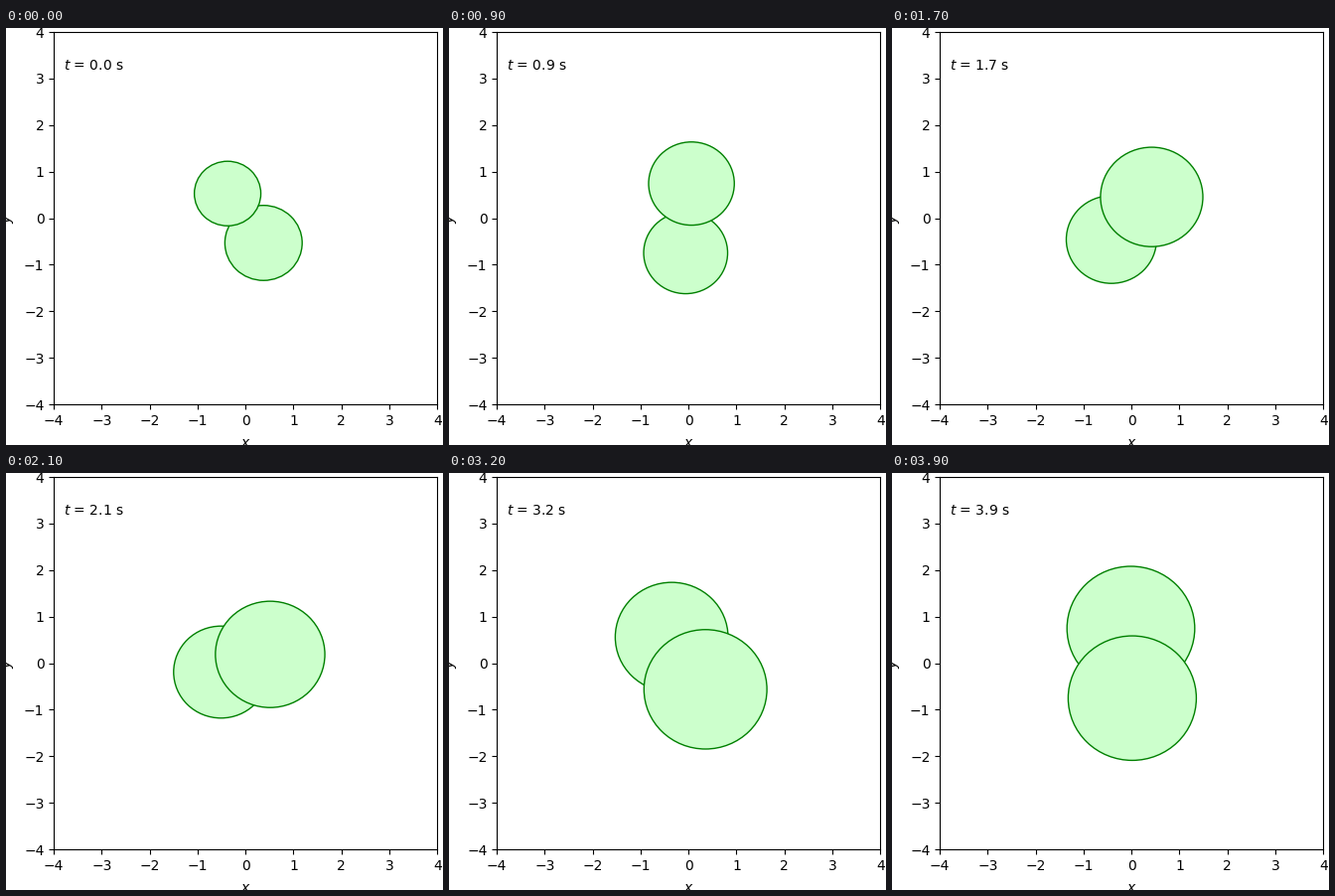
Animation of 440x420 px, one loop 4 s. Source, as a matplotlib script:

```python
import numpy as np
import matplotlib.pyplot as plt
from matplotlib.animation import FuncAnimation
from matplotlib.patches import Circle

W, H, DPI = 440, 420, 100
LEFT, RIGHT, TOP, BOTTOM = 48.2, 434.2, 4.1, 379.1   # axes box in pixels
FRAMES, INTERVAL = 40, 100
ORBIT = 0.75
RATE = 0.15          # radius gained per second and per unit of x

fig = plt.figure(figsize=(W / DPI, H / DPI), dpi=DPI, facecolor="white")
ax = fig.add_axes([LEFT / W, 1 - BOTTOM / H, (RIGHT - LEFT) / W, (BOTTOM - TOP) / H])
ax.set(xlim=(-4, 4), ylim=(-4, 4))
ax.set_xticks(range(-4, 5))
ax.set_yticks(range(-4, 5))
ax.set_xlabel("$x$", labelpad=6)
ax.set_ylabel("$y$", labelpad=6)


def make_disc(zorder):
    disc = Circle((0, 0), 1, facecolor="#ccffcc", edgecolor="green",
                  linewidth=1, zorder=zorder)
    return ax.add_patch(disc)


back, front = make_disc(2), make_disc(3)
clock = ax.text(-3.8, 3.2, "", fontsize=10, zorder=4)


def place(disc, x, y, t):
    disc.center = x, y
    disc.radius = ORBIT + RATE * (t + x)


def update(frame):
    t = frame * INTERVAL / 1000
    angle = t - np.pi / 4
    x = ORBIT / np.sqrt(2) * np.sin(angle)
    y = ORBIT * np.cos(angle)
    place(front, x, y, t)
    place(back, -x, -y, t)
    clock.set_text(f"$t$ = {t:.1f} s")
    return back, front, clock


anim = FuncAnimation(fig, update, frames=FRAMES, interval=INTERVAL,
                     repeat=True, repeat_delay=0, blit=False)
plt.show()
```
